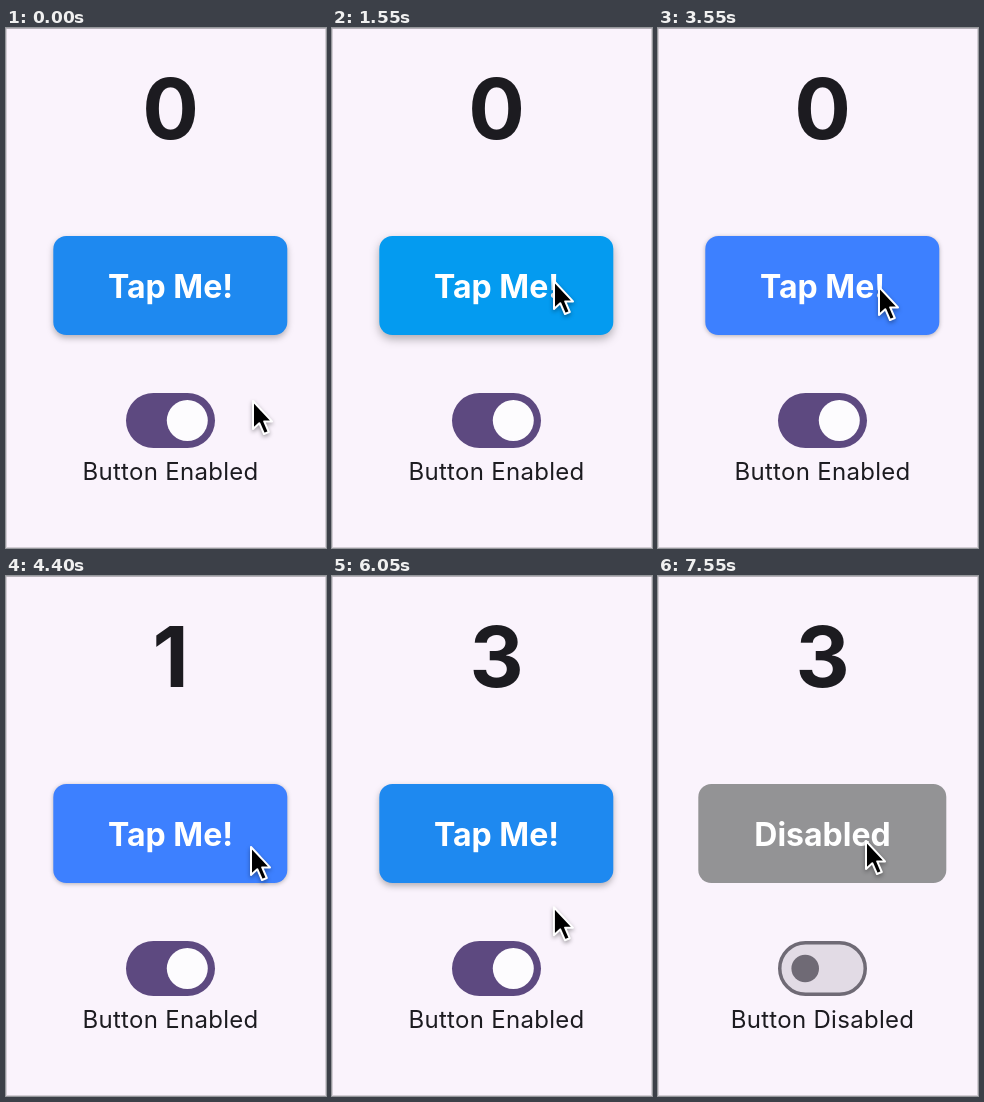
An HTML page that plays this animation: 320 px wide and 520 px high, repeating every 8 s.

```html
<!DOCTYPE html>
<html lang="en">
<head>
<meta charset="utf-8">
<title>Tap counter</title>
<style>
html, body { margin: 0; width: 100%; height: 100%; overflow: hidden; background: #faf3fc; }
svg { display: block; width: 320px; height: 520px; }
text { font-family: Inter, Roboto, sans-serif; text-anchor: middle; fill: #1c1b20; }
#count { font-size: 84px; font-weight: 700; }
#caption { font-size: 32px; font-weight: 700; fill: #fff; }
#label { font-size: 24px; letter-spacing: .3px; }
#cursor { filter: drop-shadow(0 2px 2px rgba(0, 0, 0, .35)); }
</style>
</head>
<body>
<svg viewBox="0 0 320 520">
  <path d="M.5 0V520M319.5 0V520M0 519.5H320" stroke="#d3cdd5"/>
  <path d="M0 .5H320" stroke="#b5b0b8"/>
  <text id="count" x="164.5" y="111"></text>
  <rect id="button" y="208" height="99" rx="13"/>
  <text id="caption" x="164.5" y="270"></text>
  <rect id="track" stroke-width="3.5"/>
  <circle id="knob" cy="392.5"/>
  <text id="label" x="164.5" y="452"></text>
  <path id="cursor" d="M0 0V28L6.3 22.2L11 33L15.8 31L11.2 20.4H19Z" stroke="#fff" stroke-width="2" stroke-linejoin="round"/>
</svg>
<script>
const LOOP = 8000, OFF = 6950;
const $ = id => document.getElementById(id);
const clamp = v => Math.max(0, Math.min(1, v));
const smooth = v => v * v * (3 - 2 * v);
const lerp = (a, b, k) => a + (b - a) * k;
const mix = (a, b, k) => a.map((v, i) => lerp(v, b[i], k));
const rgb = c => `rgb(${c.slice(0, 3).map(Math.round)})`;
const set = (id, attrs) => {
  for (const key in attrs) $(id).setAttribute(key, attrs[key]);
};

// time, x, y of the pointer tip
const path = [
  [0, 247, 373], [100, 247, 373], [900, 222, 253], [1900, 222, 253],
  [2500, 246, 352], [2700, 246, 352], [3300, 221, 259], [3600, 221, 259],
  [4100, 245, 271], [5650, 245, 271], [6450, 199, 391], [7000, 199, 391],
  [7550, 208, 265]
];

// red, green, blue, shadow offset, shadow blur, shadow opacity
const idle = [30, 137, 240, 3, 3, .28];
const hover = [4, 155, 240, 4, 5, .3];
const press = [61, 128, 255, 1, 2, .28];
const grey = [147, 147, 149, 0, 0, 0];
const states = [
  [-200, idle], [530, hover], [2220, idle], [2980, hover],
  [3420, press], [3700, hover], [4250, press], [4550, hover],
  [5000, press], [5250, hover], [5930, idle], [OFF, grey]
];
const taps = [3700, 4550, 5250];

function pointer(t) {
  const i = path.findIndex(p => p[0] > t);
  if (i < 0) return path.at(-1);
  const a = path[i - 1], b = path[i];
  return mix(a, b, smooth((t - a[0]) / (b[0] - a[0])));
}

function draw(t) {
  const on = t < OFF;
  const off = smooth(clamp((t - OFF) / 250));
  const [, x, y] = pointer(t);
  set('cursor', { transform: `translate(${x} ${y})` });

  const i = states.findLastIndex(s => s[0] <= t);
  const [start, now] = states[i];
  const look = mix(states[Math.max(0, i - 1)][1], now, clamp((t - start) / 110));
  const width = lerp(234, 248, off);
  set('button', { x: 164.3 - width / 2, width, fill: rgb(look) });
  $('button').style.filter =
    `drop-shadow(0 ${look[3]}px ${look[4]}px rgba(0, 0, 0, ${look[5]}))`;

  const inset = 1.75 * off;
  set('track', {
    x: 120 + inset, y: 365 + inset,
    width: 89 - 2 * inset, height: 55 - 2 * inset, rx: 27.5 - inset,
    fill: rgb(mix([93, 73, 128], [226, 219, 229], off)),
    stroke: rgb([111, 106, 117]), 'stroke-opacity': off
  });
  set('knob', {
    cx: lerp(181.3, 147.2, off), r: lerp(20.5, 13.8, off),
    fill: rgb(mix([253, 252, 254], [111, 106, 117], off))
  });

  $('count').textContent = taps.filter(tap => t >= tap).length;
  $('caption').textContent = on ? 'Tap Me!' : 'Disabled';
  $('label').textContent = on ? 'Button Enabled' : 'Button Disabled';
}

const begin = performance.now();
function frame() {
  draw((performance.now() - begin) % LOOP);
  requestAnimationFrame(frame);
}
frame();
</script>
</body>
</html>
```
